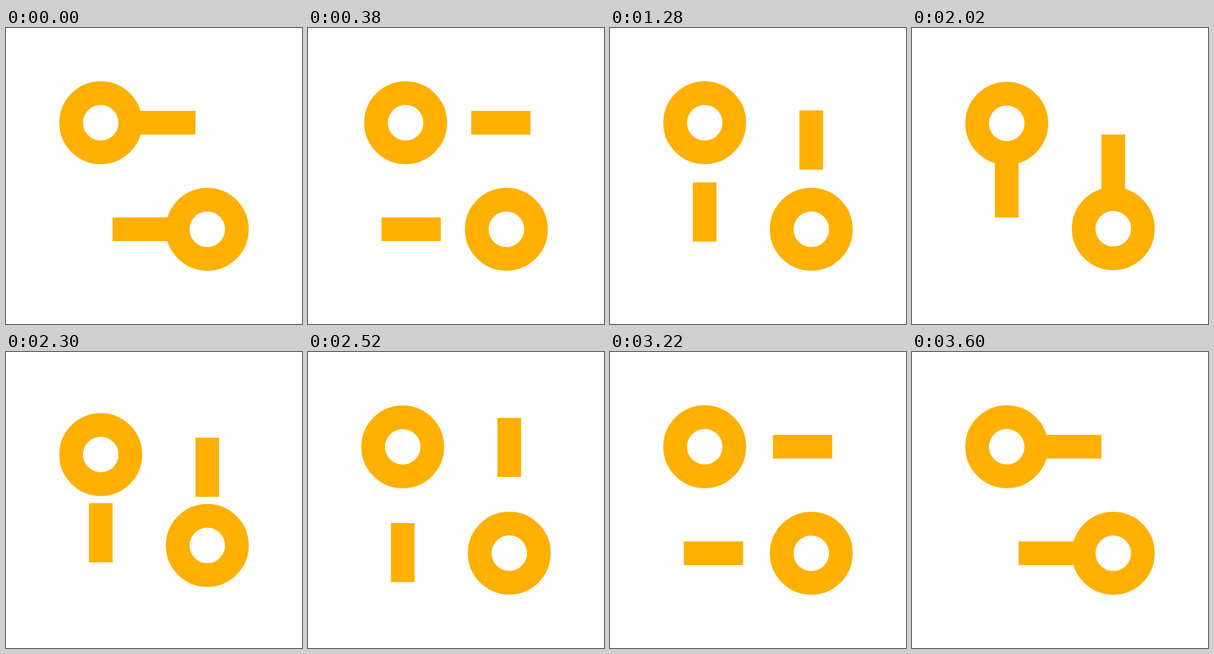
Write an HTML page that moves like this. It is 500 px wide and 500 px high and loops after 4020 ms.

```html
<!DOCTYPE html>
<html lang="en">
<head>
<meta charset="utf-8">
<title>Rings and bars</title>
<style>
  html, body { margin: 0; width: 100%; height: 100%; overflow: hidden; background: #fff; }
  svg { display: block; width: 100%; height: 100%; }
</style>
</head>
<body>
<svg viewBox="0 0 500 500">
  <g id="scene">
    <g id="pair">
      <circle id="ring" cx="160" cy="160" r="50" fill="none" stroke="#ffb000" stroke-width="40"/>
      <rect id="bar" fill="#ffb000"/>
    </g>
    <use href="#pair" transform="rotate(180 250 250)"/>
  </g>
</svg>
<script>
const LOOP = 4020, HALF = 2000;
const [scene, ring, bar] = ['scene', 'ring', 'bar'].map(id => document.getElementById(id));

const set = (el, attrs) => {
  for (const name in attrs) el.setAttribute(name, attrs[name]);
};

// cubic-bezier(.62, 0, .38, 1), solved by bisection
function ease(x) {
  if (x <= 0) return 0;
  if (x >= 1) return 1;
  let lo = 0, hi = 1, s;
  for (let i = 0; i < 24; i++) {
    s = (lo + hi) / 2;
    const r = 1 - s;
    if (1.86 * s * r * r + 1.14 * s * s * r + s * s * s < x) lo = s;
    else hi = s;
  }
  return s * s * (3 - 2 * s);
}

function draw(time) {
  const second = time >= HALF;
  const t = second ? time - HALF : time;
  const part = (from, to) => ease((t - from) / (to - from));

  const x = 270 + 70 * part(0, 600);
  const y = 160 + 70 * part(1000, 1600);
  const width = 100 - 60 * part(500, 800);
  const height = 40 + 60 * part(800, 1100);

  set(ring, { cx: 160 + 20 * (part(0, 100) - part(100, 560)) });
  set(bar, { x: x - width / 2, y: y - height / 2, width, height });
  // The second half mirrors the first across the anti-diagonal.
  set(scene, { transform: second ? 'matrix(0 -1 -1 0 500 500)' : '' });
}

const start = performance.now();
function tick(now) {
  draw(Math.max(0, now - start) % LOOP);
  requestAnimationFrame(tick);
}
draw(0);
requestAnimationFrame(tick);
</script>
</body>
</html>
```
